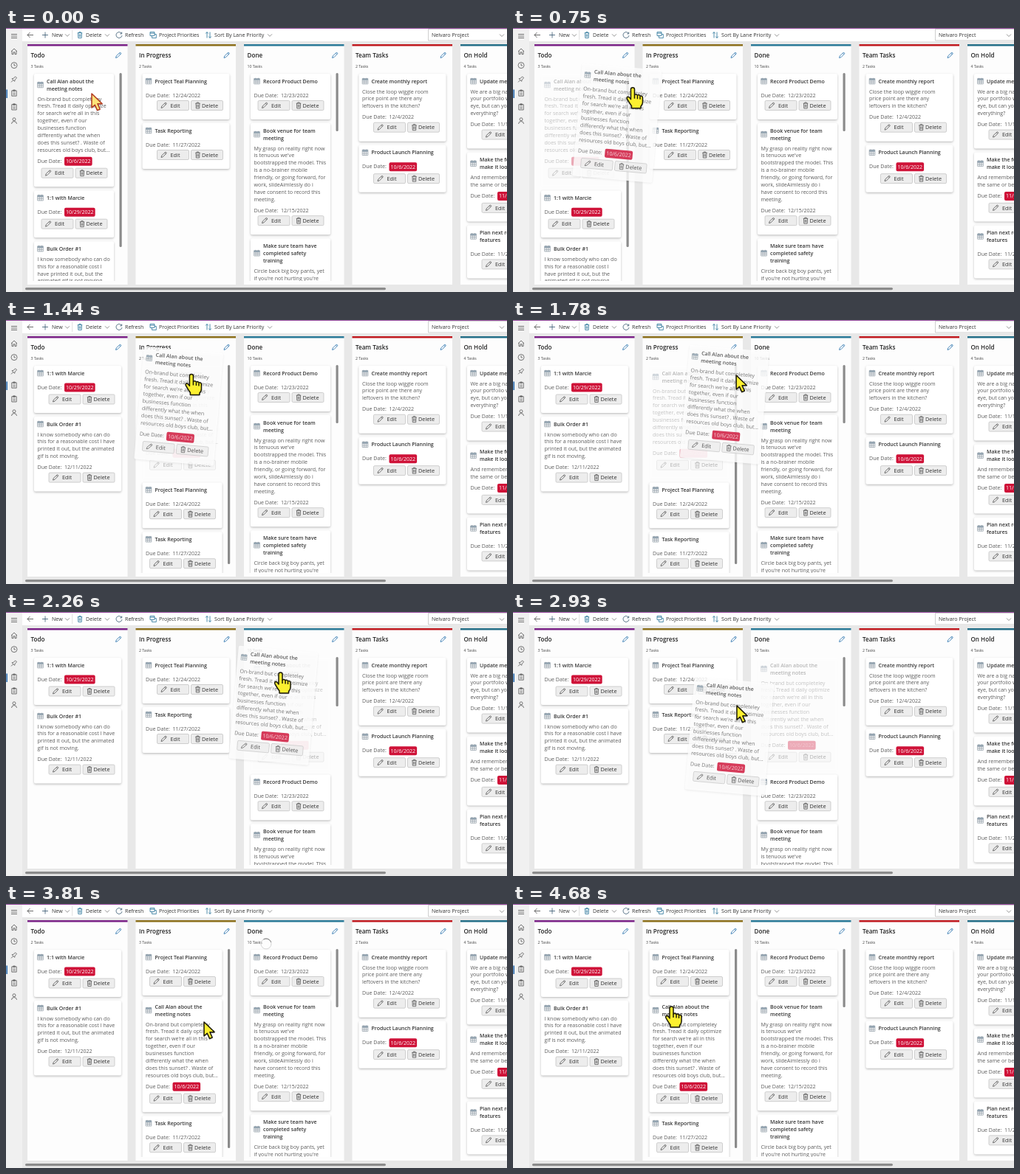
These frames come from a looping animation (678 px wide and 358 px high, 4750 ms). An HTML page with a canvas:

```html
<!DOCTYPE html>
<html lang="en">
<head>
<meta charset="utf-8">
<title>Task board drag and drop</title>
<style>
  html, body { margin: 0; width: 100%; height: 100%; overflow: hidden; background: #e8e8e8; }
  canvas { display: block; width: 678px; height: 358px; }
</style>
</head>
<body>
<canvas id="stage"></canvas>
<script>
const LOOP = 4750, LIFT = 150, DROP = 3500;
const ROW = 9.9, GAP = 5;
const canvas = document.getElementById('stage');
const ctx = canvas.getContext('2d');
const dpr = window.devicePixelRatio || 1;
canvas.width = 678 * dpr;
canvas.height = 358 * dpr;

const task = (title, date, body = '', due = false) => ({
  title: title.split('|'), body: body ? body.split('|') : [], date, due
});
const heightOf = c => 62 + 10 * (c.title.length - 1) + ROW * c.body.length + (c.due ? 2 : 0);

const call = task('Call Alan about the|meeting notes', '10/6/2022',
  "On-brand but completeley|fresh. Tread it daily optimize|for search we're all in this|together, even if our|" +
  'businesses function|differently what the when|does this sunset? . Waste of|resources old boys club, but...', true);
const oneOnOne = task('1:1 with Marcie', '10/29/2022', '', true);
const bulkNarrow = task('Bulk Order #1', '12/11/2022',
  'I know somebody who can do|this for a reasonable cost I|have printed it out, but the|animated gif is not moving.');
const bulkWide = task('Bulk Order #1', '12/11/2022',
  'I know somebody who can do|this for a reasonable cost I have|printed it out, but the animated|gif is not moving.');
const planning = task('Project Teal Planning', '12/24/2022');
const reporting = task('Task Reporting', '11/27/2022');
const doneTasks = [
  task('Record Product Demo', '12/23/2022'),
  task('Book venue for team|meeting', '12/15/2022',
    "My grasp on reality right now|is tenuous we've|bootstrapped the model. This|is a no-brainer mobile|" +
    'friendly, or going forward, for|work, slideAimlessly do i|have consent to record this|meeting.'),
  task('Make sure team have|completed safety|training', '12/20/2022',
    "Circle back big boy pants, yet|if you're not hurting you're|winning")
];
const teamTasks = [
  task('Create monthly report', '12/4/2022',
    'Close the loop wiggle room|price point are there any|leftovers in the kitchen?'),
  task('Product Launch Planning', '10/6/2022', '', true)
];
const holdTasks = [
  task('Update metrics', '11/12/2022',
    'We are a big name and|your portfolio will catch the|eye, but can you show me|everything?'),
  task('Make the font bigger|make it look nice', '11/17/2022', 'And remember to keep it|the same or better', true),
  task('Plan next release|features', '11/28/2022')
];

const ICON = {
  pencil: 'M-3.5 3.5L-2.7 .8L2.2-3.7Q3.8-3.6 3.7-2.2L-1 2.7ZM1.2-2.8L2.8-1.3',
  trash: 'M-3.2-2.8H3.2M-1.2-2.8V-4H1.2V-2.8M-2.5-2.8L-2.2 4H2.2L2.5-2.8M-.8-1.2V2.5M.8-1.2V2.5',
  calendar: 'M-3.8-3.4H3.8V3.8H-3.8ZM-3.8-1.2H3.8M-3.8 1.2H3.8M-1.3-1.2V3.8M1.3-1.2V3.8M-2-4.3V-2.6M2-4.3V-2.6',
  chevron: 'M-3-1.5L0 1.5L3-1.5',
  back: 'M4 0H-4M-.5-3.5L-4 0L-.5 3.5',
  plus: 'M-4 0H4M0-4V4',
  refresh: 'M3.5-2A4 4 0 1 0 4 .6M3.7-4V-1.6H1.2',
  windows: 'M-4-4H2V1H-4ZM-1.5 1V4H4.3V-1H2M-4-2.3H2',
  sort: 'M-2 4V-4M-3.8-2L-2-4L-.2-2M2-4V4M.2 2L2 4L3.8 2',
  menu: 'M-4-2.5H4M-4 0H4M-4 2.5H4',
  home: 'M-4 0L0-3.8L4 0M-3-1V3.8H-1V1H1V3.8H3V-1',
  clock: 'M4 0A4 4 0 1 1-4 0A4 4 0 1 1 4 0M0-2.4V.3H2',
  pin: 'M-4 4L-1.2 1.2M-3-.6L.6 3L1.2 .6L3.6-1.6L1.6-3.6L-.6-1.2Z',
  board: 'M-3.2-3.3H3.2V4H-3.2ZM-1.2-4.2H1.2V-2.5H-1.2ZM-1.5 0H1.5M-1.5 2H1.5',
  person: 'M2-2A2 2 0 1 1-2-2A2 2 0 1 1 2-2M-3.5 4.2Q-3.3 .8 0 .8T3.5 4.2'
};
const ARROW = new Path2D('M0 0V19L4.3 15.2L7.6 22.6L11.2 21L7.9 13.8H14.2Z');
const HAND = new Path2D('M-3 1.5Q-3-1-.5-1Q2-1 2 1.5V9Q4 7.5 6 9.5Q8.5 8.5 9.5 10.5Q13 10 13 13V19' +
  'Q13 22 10.5 24.5V27H-2V24Q-5 20-8 14.5Q-9 12-7 11.5Q-5 11.5-3 15Z');

// time, pointer tip, centre of the dragged card
const PATH = [
  [0, 116, 89, 92, 139], [350, 116, 89, 92, 139], [1170, 211, 74, 192, 119],
  [1780, 302, 75, 286, 115], [2260, 372, 83, 362, 127], [2560, 376, 100, 366, 144],
  [2930, 303, 127, 293, 169], [DROP, 268, 160, 239, 206], [4050, 268, 160, 239, 206],
  [4500, 215, 140, 239, 206], [LOOP, 215, 140, 239, 206]
];

const ramp = (t, a, b) => Math.min(1, Math.max(0, (t - a) / (b - a)));

function poseAt(t) {
  const i = PATH.findIndex(k => k[0] > t);
  const a = PATH[i - 1], b = PATH[i], f = ramp(t, a[0], b[0]);
  return a.map((v, j) => v + (b[j] - v) * f);
}

function text(str, x, y, size = 7.1, color = '#5c5c5c', weight = 400) {
  ctx.font = `${weight} ${size}px "Open Sans", "Noto Sans", sans-serif`;
  ctx.fillStyle = color;
  ctx.fillText(str, x, y + size * 0.36);
}

function rect(x, y, w, h, fill, radius = 0, stroke) {
  ctx.beginPath();
  ctx.roundRect(x, y, w, h, radius);
  ctx.fillStyle = fill;
  ctx.fill();
  if (stroke) {
    ctx.strokeStyle = stroke;
    ctx.lineWidth = 0.7;
    ctx.stroke();
  }
}

function icon(name, x, y, color = '#444', width = 0.8) {
  ctx.save();
  ctx.translate(x, y);
  ctx.strokeStyle = color;
  ctx.lineWidth = width;
  ctx.stroke(new Path2D(ICON[name]));
  ctx.restore();
}

function shadow(color, blur, dy) {
  ctx.shadowColor = color;
  ctx.shadowBlur = blur * dpr;
  ctx.shadowOffsetY = dy * dpr;
}

function button(x, y, glyph, label, indent) {
  rect(x, y - 6.5, 43, 13, '#ededed', 1.5, '#bdbdbd');
  icon(glyph, x + 9, y, '#555');
  text(label, x + indent, y, 7.3, '#303030');
}

function drawCard(c, x, y, w, alpha = 1) {
  if (alpha <= 0) return;
  const extra = 10 * (c.title.length - 1), body = extra + ROW * c.body.length;
  ctx.save();
  ctx.globalAlpha = alpha;
  // a see-through card would be darkened by its own shadow
  shadow(`rgba(0,0,0,${alpha < 1 ? 0.1 * alpha : 0.26})`, 3, 1.2);
  rect(x, y, w, heightOf(c), '#fff', 2);
  shadow('transparent', 0, 0);
  icon('calendar', x + 8.5, y + 10 + extra / 2, '#75848f', 0.6);
  rect(x + 4.7, y + 6.6 + extra / 2, 7.6, 2.2, '#93a4b1');
  c.title.forEach((s, i) => text(s, x + 17, y + 10 + 10 * i, 7, '#363636', 600));
  c.body.forEach((s, i) => text(s, x + 4.5, y + 24 + extra + ROW * i));
  const dueY = y + 29 + body;
  text('Due Date:', x + 4.5, dueY);
  if (c.due) {
    const width = ctx.measureText(c.date).width;
    rect(x + 41, dueY - 5.5, width + 4, 12, '#cf1238', 2);
    text(c.date, x + 43, dueY + 0.5, 7.1, '#fff');
  } else text(c.date, x + 41, dueY);
  const by = y + 43 + body + (c.due ? 2.5 : 0);
  button(x + w - 98, by, 'pencil', 'Edit', 18);
  button(x + w - 52, by, 'trash', 'Delete', 14.5);
  ctx.restore();
}

// items: [card, share of its height taken up, alpha]
function drawLane(index, name, color, count, items, barEnd) {
  const x = 29 + 146.5 * index;
  rect(x, 22, 135.5, 326, '#fdfdfd');
  rect(x, 22, 135.5, 2.4, color);
  text(name, x + 4.5, 37.5, 8.1, '#242424', 600);
  text(count + ' Tasks', x + 4.5, 52.5, 5.2, '#444');
  icon('pencil', x + 123, 37, '#3d7fb5', 0.9);
  ctx.save();
  ctx.beginPath();
  ctx.rect(x, 58, 135.5, 285);
  ctx.clip();
  let y = 62;
  for (const [card, share = 1, alpha = 1] of items) {
    drawCard(card, x + 9, y, barEnd ? 108 : 118, alpha);
    y += (heightOf(card) + GAP) * share;
  }
  ctx.restore();
  if (barEnd) rect(x + 124.5, 61, 3.2, barEnd - 61, '#8b8b8b', 1.5);
}

function drawFrame() {
  rect(0, 0, 678, 358, '#e8e8e8');
  rect(22, 0, 656, 18, '#fff');
  rect(0, 0, 22, 358, '#f0f0f0');
  rect(0, 0, 678, 1, '#93479c');
  rect(0.4, 83.5, 1.6, 11.5, '#2b6cb0');
  ['menu', 'home', 'clock', 'pin', 'board', 'board', 'person']
    .forEach((name, i) => icon(name, 11, i ? 13 + 18.8 * i : 11, '#555'));
  icon('back', 33, 9.5);
  icon('plus', 53, 9.5, '#35566f');
  icon('trash', 100, 9.5, '#287398');
  icon('refresh', 153, 9.5, '#35566f');
  icon('windows', 199, 9.5, '#287398');
  icon('sort', 274, 9.5, '#287398');
  [['New', 62], ['Delete', 108], ['Refresh', 161], ['Project Priorities', 207], ['Sort By Lane Priority', 282]]
    .forEach(([s, x]) => text(s, x, 9.5, 7.1, '#333'));
  [83, 137, 357].forEach(x => icon('chevron', x, 9.8, '#666', 0.7));
  rect(89.5, 3, 0.6, 13, '#ccc');
  rect(571.5, 1.5, 120, 15.5, '#fff', 0, '#bbb');
  text('Nelvaro Project', 576, 9.5, 7.1, '#333');
  icon('chevron', 671, 10, '#666', 0.7);
  rect(26, 352, 488, 3.2, '#8b8b8b', 1.6);
}

function drawPointer(t, x, y) {
  const hand = (t > 700 && t < 1500) || (t > 2020 && t < 2650) || t > 4250;
  const pressed = t < LIFT;
  ctx.save();
  ctx.translate(x, y);
  ctx.lineJoin = 'round';
  const shape = hand ? HAND : ARROW;
  shadow('rgba(0,0,0,.35)', 2, 1);
  ctx.fillStyle = pressed ? '#fce47a' : '#fdf030';
  ctx.fill(shape);
  shadow('transparent', 0, 0);
  ctx.strokeStyle = pressed ? '#b23a20' : '#1c1a08';
  ctx.lineWidth = 1.5;
  ctx.stroke(shape);
  if (hand) ctx.stroke(new Path2D('M2 9V14M6 10V14.5M9.5 11V15'));
  ctx.restore();
}

function drawSpinner(t) {
  if (t < 3560 || t > 4050) return;
  const a = t / 130;
  ctx.lineWidth = 1;
  for (const [color, from, to] of [['#d4d4d4', 0, Math.PI * 2], ['#777', a, a + 1.8]]) {
    ctx.beginPath();
    ctx.arc(352, 54, 7, from, to);
    ctx.strokeStyle = color;
    ctx.stroke();
  }
}

function draw() {
  const t = performance.now() % LOOP;
  const [, px, py, cx, cy] = poseAt(t);
  const toProgress = ramp(t, 1050, 1258), toDone = ramp(t, 1950, 2150), backAgain = ramp(t, 2960, 3160);
  const lifted = t >= LIFT && t < DROP, dropped = t >= DROP;
  // a slot fades in once it is nearly open and turns solid when the card rests in it
  const slot = share => [call, share, Math.max(0, 3 * share - 2) * (lifted ? 0.35 : 1)];
  const inTodo = toProgress === 0;
  const topSlot = toProgress - toDone, doneSlot = toDone - backAgain;

  ctx.setTransform(dpr, 0, 0, dpr, 0, 0);
  drawFrame();
  drawLane(0, 'Todo', '#7b2387', dropped ? 2 : 3,
    [slot(1 - toProgress), [oneOnOne], [inTodo ? bulkNarrow : bulkWide]], inTodo ? 297 : 0);
  drawLane(1, 'In Progress', '#8c701c', dropped ? 3 : 2,
    [slot(topSlot), [planning], slot(backAgain), [reporting]], topSlot + backAgain > 0 ? 331 : 0);
  drawLane(2, 'Done', '#2b7a98', 10,
    [slot(doneSlot), ...doneTasks.map(c => [c])], doneSlot > 0 ? 128 : 140);
  drawLane(3, 'Team Tasks', '#c01a20', 2, teamTasks.map(c => [c]));
  drawLane(4, 'On Hold', '#256f88', 4, holdTasks.map(c => [c]));
  drawSpinner(t);

  if (lifted) {
    const tilt = 5 * (ramp(t, LIFT, 300) - ramp(t, 3380, DROP));
    ctx.save();
    ctx.translate(cx, cy);
    ctx.rotate(tilt * Math.PI / 180);
    drawCard(call, -54, -77, 108, 0.82);
    ctx.restore();
  }
  drawPointer(t, px, py);
  requestAnimationFrame(draw);
}
draw();
</script>
</body>
</html>
```
